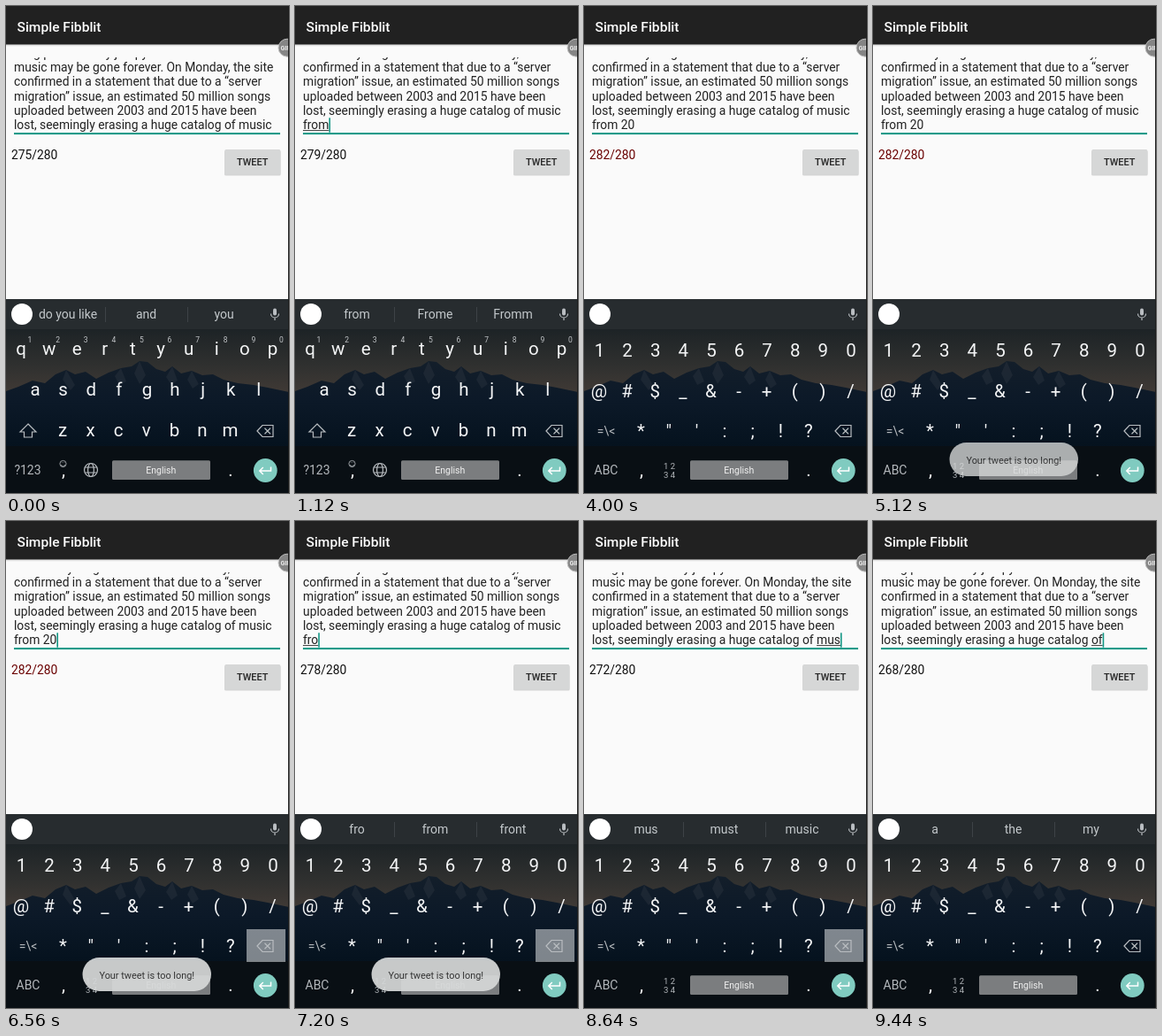
An HTML page for the animation above (9600 ms loop, 320 px wide and 550 px high).

```html
<!DOCTYPE html>
<html lang="en">
<head>
<meta charset="utf-8">
<title>Simple Fibblit</title>
<style>
html, body { margin: 0; width: 100%; height: 100%; overflow: hidden; background: #fafafa; }
svg { display: block; width: 100%; height: 100%; font-family: Roboto, sans-serif; }
text { white-space: pre; }
.mid { text-anchor: middle; }
.body { font-size: 13.85px; fill: #222; }
.key { font-size: 20.5px; fill: #f4f5f6; }
.hint { font-size: 8.5px; fill: #c2c5c8; }
.fn { font-size: 14px; fill: #b4b8bc; }
.tiny { font-size: 9.5px; }
.sug { font-size: 14px; fill: #c3c8cb; }
.icon { fill: none; stroke: #b9bdc1; stroke-width: 1.2; }
</style>
</head>
<body>
<svg viewBox="0 0 320 550" preserveAspectRatio="none">
  <defs>
    <linearGradient id="sky" x1="0" y1="0" x2="0" y2="1">
      <stop offset="0" stop-color="#1d2326"/>
      <stop offset=".5" stop-color="#2f302f"/>
      <stop offset="1" stop-color="#443c37"/>
    </linearGradient>
    <linearGradient id="rock" x1="0" y1="0" x2="0" y2="1">
      <stop offset="0" stop-color="#131e2a"/>
      <stop offset=".3" stop-color="#0c1928"/>
      <stop offset=".65" stop-color="#05121e"/>
      <stop offset="1" stop-color="#050f18"/>
    </linearGradient>
    <linearGradient id="shade" x1="0" y1="0" x2="0" y2="1">
      <stop offset="0" stop-color="#000" stop-opacity=".16"/>
      <stop offset="1" stop-color="#000" stop-opacity="0"/>
    </linearGradient>
    <clipPath id="field"><rect x="5" y="58" width="310" height="90"/></clipPath>
  </defs>

  <rect width="320" height="550" fill="#fafafa"/>
  <rect width="320" height="43.5" fill="#212121"/>
  <rect y="43.5" width="320" height="2.5" fill="url(#shade)"/>
  <text x="12.5" y="28.6" font-size="15.56" font-weight="500" fill="#fff">Simple Fibblit</text>

  <g id="lines" class="body" clip-path="url(#field)"></g>
  <rect id="compose" y="140.2" height=".9" fill="#222"/>
  <rect x="9" y="143.1" width="301" height="2" fill="#129684"/>
  <rect id="caret" y="126.3" width="1.6" height="16.4" fill="#129684"/>
  <text id="count" class="body" x="6" y="172.8"></text>

  <rect x="247" y="163.2" width="63.6" height="28.4" rx="1.5" fill="#000" opacity=".16"/>
  <rect id="button" x="247.3" y="162" width="63" height="28.4" rx="1.5"/>
  <text class="mid" x="278.7" y="180.2" font-size="10.9" font-weight="500" fill="#222">TWEET</text>

  <circle cx="318" cy="47.2" r="10" fill="#858585" stroke="#bdbdbd"/>
  <text x="310.5" y="49.8" font-size="7" font-weight="700" fill="#eee">GIF</text>

  <rect y="331" width="320" height="219" fill="#050f18"/>
  <rect y="365" width="320" height="80" fill="url(#sky)"/>
  <path fill="url(#rock)" d="M0 435L14 430 30 423 44 426 56 416 68 411 78 416 90 413 102 421 116 414 130 409 142 407 151 401 160 402 170 410 180 413 188 407 198 415 210 412 222 417 234 416 246 422 262 426 280 428 296 431 320 436V550H0Z"/>
  <path fill="#39414a" opacity=".3" d="M68 411L78 428 73 434 64 422ZM151 401L158 417 151 427 145 415ZM188 407L194 423 187 428 181 419ZM210 412L218 427 211 432 205 422ZM130 409L136 424 128 428 123 418Z"/>
  <rect y="497" width="320" height="53" fill="#090f14"/>
  <rect y="331" width="320" height="34" fill="#272c2f"/>

  <circle cx="18" cy="348" r="12" fill="#fff"/>
  <g id="sugs">
    <path d="M112.5 340V357M205.5 340V357" stroke="#3e4347"/>
    <text class="sug mid" x="70" y="353"></text>
    <text class="sug mid" x="158.5" y="353"></text>
    <text class="sug mid" x="246.5" y="353"></text>
  </g>
  <g class="icon">
    <rect x="302" y="341.5" width="4" height="8" rx="2" fill="#b9bdc1" stroke="none"/>
    <path d="M299.5 347.5a4.5 4.5 0 0 0 9 0M304 352V355"/>
  </g>

  <g id="letters">
    <path class="icon" d="M25 472L34 481H29.5V487H20.5V481H16Z"/>
    <g class="icon" style="stroke-width:.8"><circle cx="64.5" cy="517" r="3.6"/><path d="M62.5 518a2 2 0 0 0 4 0M63 515.6h.6M65.5 515.6h.6"/></g>
    <g class="icon"><circle cx="96" cy="524" r="7.5"/><ellipse cx="96" cy="524" rx="3.4" ry="7.5"/><path d="M89.2 521H102.8M89.2 527H102.8"/></g>
    <text class="fn mid" x="24.5" y="529">?123</text>
  </g>
  <g id="symbols">
    <text class="fn mid" x="25" y="484.5">=\&lt;</text>
    <text class="fn mid" x="25" y="529">ABC</text>
    <text class="fn tiny mid" x="96.5" y="522.5">1 2</text>
    <text class="fn tiny mid" x="96.5" y="532.5">3 4</text>
  </g>

  <rect id="erase" x="272" y="461" width="44" height="37" fill="#c8cccf" opacity=".62"/>
  <path class="icon" d="M284 480L290 473.5H302V486.5H290ZM292.5 476.8L299 483.2M299 476.8L292.5 483.2"/>
  <rect id="space" x="120" y="513.3" width="111" height="21.7" rx="1.5"/>
  <text class="mid" x="175.3" y="527.8" font-size="10.5" fill="#f0f0f0">English</text>
  <text class="key mid" x="65" y="531">,</text>
  <text class="key mid" x="254" y="530.5">.</text>
  <circle cx="293.3" cy="524.5" r="13.4" fill="#80cbc0"/>
  <path d="M299.5 520.5V525H287M290.8 521L286.8 525 290.8 529" fill="none" stroke="#fff" stroke-width="1.5"/>

  <g id="toast">
    <rect x="86.5" y="493" width="145.5" height="38" rx="19" fill="#d6d8d8" opacity=".93"/>
    <text class="mid" x="159.3" y="516.6" font-size="10.9" fill="#333">Your tweet is too long!</text>
  </g>
  <rect x="319" width="1" height="550" fill="#1c1c1c"/>
</svg>
<script>
const LOOP = 9600, LEFT = 9, BASE = 138.6, PITCH = 16.05;
const $ = id => document.getElementById(id);
const show = (id, on) => $(id).setAttribute('visibility', on ? 'visible' : 'hidden');

const PROSE = [
  'a big part of every jumpy tune and',
  'music may be gone forever. On Monday, the site',
  'confirmed in a statement that due to a “server',
  'migration” issue, an estimated 50 million songs',
  'uploaded between 2003 and 2015 have been'
];
const LAST = 'lost, seemingly erasing a huge catalog ';
const TAIL = 'of music from 20', TAIL_START = 266, WRAP = 9;

// time, character count, caret visible, pressed key
const STEPS = [
  [0, 275, 0], [160, 275, 1], [640, 276, 1], [800, 277, 1], [960, 278, 1], [1120, 279, 1],
  [1760, 279, 0], [2080, 279, 1, 'space'], [2240, 280, 1], [2720, 280, 0],
  [3200, 281, 1], [3360, 282, 1], [4000, 282, 0], [4480, 282, 1], [4800, 282, 1, 'button'],
  [4960, 282, 0, 'button'], [5120, 282, 0], [5440, 282, 1], [5920, 282, 0], [6400, 282, 1],
  [6560, 282, 1, 'erase'], [6720, 281, 1], [6880, 280, 1, 'erase'], [7040, 279, 1],
  [7200, 278, 1, 'erase'], [7360, 278, 1], [7520, 277, 1, 'erase'], [7680, 276, 1, 'erase'],
  [7840, 276, 1], [8000, 275, 1], [8320, 274, 1, 'erase'], [8480, 273, 1],
  [8640, 272, 1, 'erase'], [8800, 271, 1], [8960, 270, 1, 'erase'], [9120, 269, 1],
  [9280, 268, 1, 'erase'], [9440, 268, 1]
];
const FADE = [[0, 0], [4960, .45], [5120, .86], [5280, .95], [5440, 1], [8320, .8], [8480, .4], [8640, 0]];
const HINTS = {
  268: 'a|the|my', 269: 'a|the|my', 270: 'm|my|me', 271: 'mu|much|must', 272: 'mus|must|music',
  273: 'musi|music|musical', 274: 'music|musical|musician', 275: 'do you like|and|you',
  276: 'f|for|festival', 277: 'fr|from|friend', 278: 'fro|from|front',
  279: 'from|Frome|Fromm', 280: 'the|a|my'
};

function addText(parent, cls, x, y, str = '') {
  const el = document.createElementNS('http://www.w3.org/2000/svg', 'text');
  el.setAttribute('class', cls);
  el.setAttribute('x', x);
  el.setAttribute('y', y);
  el.textContent = str;
  parent.append(el);
  return el;
}
function addRow(id, chars, x, y, cls = 'key mid') {
  [...chars].forEach((c, i) => addText($(id), cls, x + 31.6 * i, y, c));
}
addRow('letters', 'qwertyuiop', 17, 394);
addRow('letters', '1234567890', 27, 379.5, 'hint mid');
addRow('letters', 'asdfghjkl', 33, 439.6);
addRow('letters', 'zxcvbnm', 64, 486);
addRow('symbols', '1234567890', 17.5, 396.3);
addRow('symbols', '@#$_&-+()/', 17, 442);
addRow('symbols', '*"\':;!?', 64.3, 487);

const rows = PROSE.concat('', '').map(s => addText($('lines'), 'body', LEFT, 0, s));
const sugs = $('sugs').querySelectorAll('text');
const pen = document.createElement('canvas').getContext('2d');
function width(s) {
  pen.font = '13.85px Roboto, sans-serif';
  return pen.measureText(s).width;
}
const at = (list, t) => list.filter(s => s[0] <= t).pop();

function draw(t) {
  const [, n, caret, pressed] = at(STEPS, t);
  const tail = TAIL.slice(0, n - TAIL_START);
  const wrapped = n > 276;
  const fifth = LAST + (wrapped ? tail.slice(0, WRAP) : tail);
  const current = wrapped ? tail.slice(WRAP) : fifth;

  rows[5].textContent = fifth;
  rows[6].textContent = wrapped ? current : '';
  const lastRow = wrapped ? 6 : 5;
  rows.forEach((row, i) => row.setAttribute('y', BASE + (i - lastRow) * PITCH));

  const end = LEFT + width(current);
  const word = current.match(/[a-z]*$/)[0];
  const start = LEFT + width(current.slice(0, current.length - word.length));
  $('compose').setAttribute('x', start);
  $('compose').setAttribute('width', end - start);
  $('caret').setAttribute('x', end);
  show('caret', caret);

  $('count').textContent = n + '/280';
  $('count').style.fill = n > 280 ? '#6a0000' : '#111';

  const symbols = t >= 3200;
  show('letters', !symbols);
  show('symbols', symbols);
  // suggestions lag one step behind the space key
  const words = HINTS[t >= 2240 && t < 2400 ? 279 : n];
  show('sugs', words);
  if (words) words.split('|').forEach((w, i) => sugs[i].textContent = w);

  show('erase', pressed === 'erase');
  $('space').setAttribute('fill', pressed === 'space' ? '#b9babb' : '#7b7d7f');
  $('button').setAttribute('fill', pressed === 'button' ? '#bcbdbd' : '#d6d7d7');
  $('toast').setAttribute('opacity', at(FADE, t)[1]);
}

const began = performance.now();
function tick() {
  draw((performance.now() - began) % LOOP);
  requestAnimationFrame(tick);
}
tick();
</script>
</body>
</html>
```
